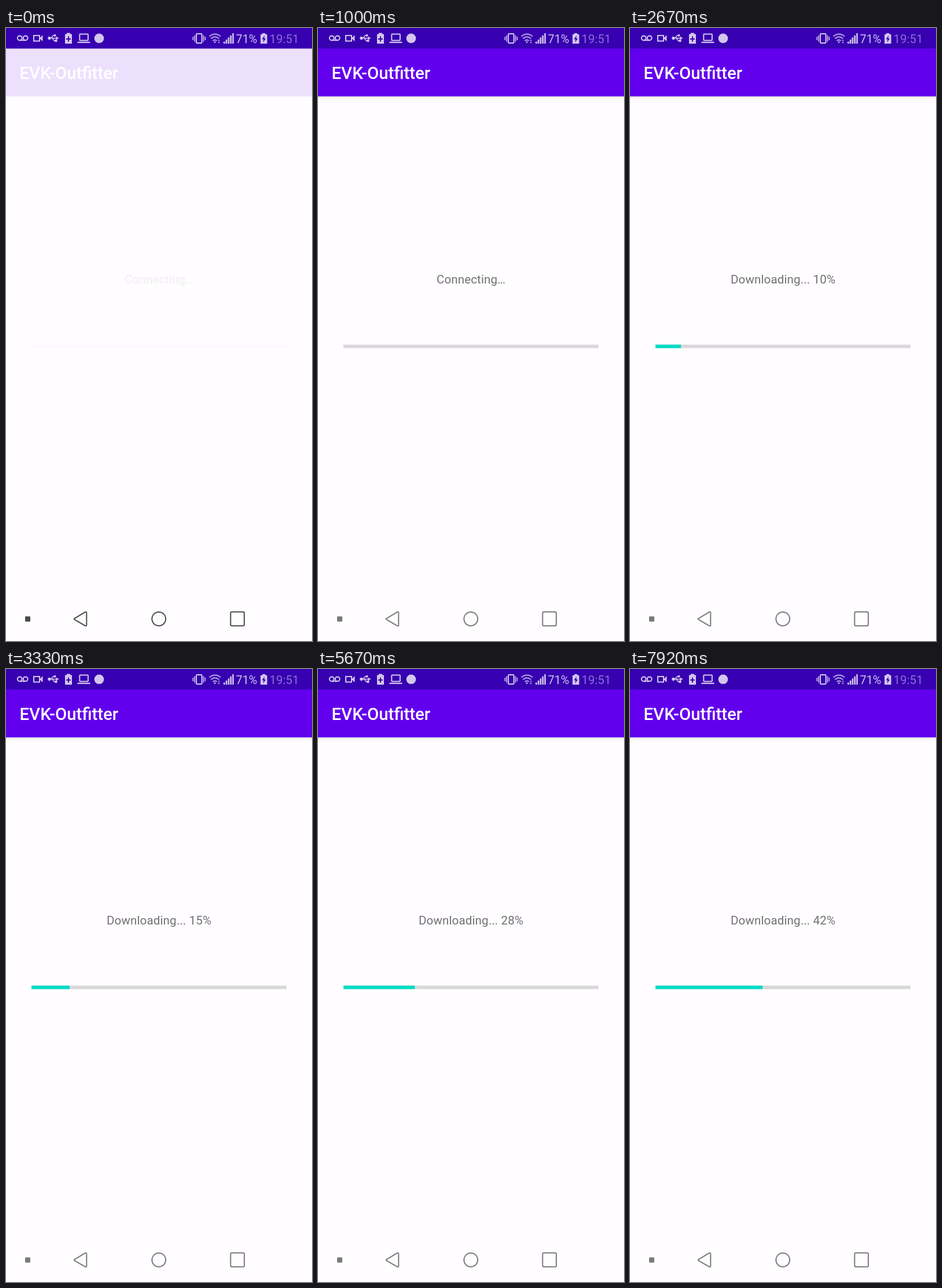
Write an HTML page that moves like this. It is 529 px wide and 1058 px high and loops after 8000 ms.

```html
<!DOCTYPE html>
<html lang="en">
<head>
<meta charset="utf-8">
<title>Download progress</title>
<style>
  html, body { margin: 0; width: 100%; height: 100%; overflow: hidden; background: #fffdff; }
  svg { display: block; width: 529px; height: 1058px; }
  text { font-family: Roboto, "Noto Sans", sans-serif; }
  .line { fill: none; stroke-width: 2; }
  #status { fill: #d2c6ee; stroke: none; }
  #status .line { fill: none; stroke: #d2c6ee; }
  #status .cut { fill: #3700b0; }
  #status .dim { fill: #b9a5e3; }
  #label { font-size: 20.57px; letter-spacing: .12px; fill: #727073; text-anchor: middle; }
  #title { font-size: 29.4px; font-weight: 500; fill: #fff; }
</style>
</head>
<body>
<svg viewBox="0 0 529 1058">
  <defs>
    <linearGradient id="shade" x2="0" y2="1">
      <stop stop-color="#000" stop-opacity=".12"/>
      <stop offset="1" stop-color="#000" stop-opacity="0"/>
    </linearGradient>
  </defs>
  <rect width="529" height="1058" fill="#fffdff"/>

  <g id="page">
    <rect y="118" width="529" height="5" fill="url(#shade)"/>
    <rect y="35" width="529" height="83" fill="#6200ee"/>
    <text id="label" x="264.5" y="441"></text>
    <rect x="44" y="546.5" width="441" height="6" fill="#dad7da"/>
    <rect id="bar" x="44" y="546.5" width="0" height="6" fill="#00dbc4"/>
  </g>
  <text id="title" x="23.5" y="88">EVK-Outfitter</text>

  <rect width="529" height="35.5" fill="#3700b0"/>
  <g id="status">
    <!-- voicemail, camera -->
    <g class="line">
      <circle cx="23.7" cy="17.3" r="3.9"/>
      <circle cx="33.7" cy="17.3" r="3.9"/>
      <path d="M23.7 21.2H33.7"/>
      <rect x="48" y="13" width="10" height="9.5"/>
    </g>
    <path d="M58 17.7L63.5 12.3V23Z"/>
    <!-- usb -->
    <path class="line" style="stroke-width:1.6" d="M75 17.5H87M78 17.5L81.5 13H84M80 17.5L83.5 22H86"/>
    <circle cx="75" cy="17.5" r="2.7"/>
    <path d="M86.5 14.5L91.5 17.5L86.5 20.5Z"/>
    <circle cx="84.5" cy="12.7" r="2"/>
    <rect x="84.5" y="20" width="4" height="4"/>
    <!-- charge saver -->
    <path d="M105 8.5H111V10.5H114V27H102V10.5H105Z"/>
    <path class="cut" d="M107 14.5H109V18H112V20H109V23.5H107V20H104V18H107Z"/>
    <!-- laptop -->
    <rect class="line" x="127.3" y="10.5" width="14.6" height="11" rx="1"/>
    <rect x="123.5" y="23.7" width="22" height="2.2"/>
    <circle cx="161" cy="17.8" r="8.3"/>
    <!-- vibrate -->
    <rect class="line" x="329" y="10" width="9.6" height="16" rx="1.2"/>
    <path class="line" style="stroke-width:1.6" d="M326.2 12.5V23.5M323.3 15V21M341.5 12.5V23.5M344.4 15V21"/>
    <!-- wifi -->
    <g class="line" style="stroke-width:1.9;opacity:.85">
      <path d="M351.5 14.5Q361.3 6.5 371 14.5"/>
      <path d="M354.3 18.3Q361.3 12.3 368.2 18.3"/>
      <path d="M357.5 22Q361 18.8 364.5 22"/>
    </g>
    <path class="dim" d="M359 24L361 22.6L363 24L361 26.5ZM366 22.3L368 19.8L370 22.3ZM366 24L368 26.5L370 24Z"/>
    <g id="bars"></g>
    <text x="397.6" y="25.7" font-size="19.7">71%</text>
    <path d="M443 9H448.500V11H451.500V27H440V11H443Z"/>
    <path class="cut" d="M447 13L442.500 19.600H445.300L444.400 25L449.200 18H446.300Z"/>
    <text x="455.5" y="25.7" font-size="20.5" fill="#8d6dd0">19:51</text>
  </g>

  <g id="nav" class="line" stroke-linejoin="round">
    <rect id="dot" x="33" y="1015.500" width="9" height="9" rx="1" stroke="none"/>
    <path d="M118.300 1019.200L136.800 1008.200Q139.300 1007 139.300 1009.500V1030.300Q139.300 1032.800 136.800 1031.600L118.300 1020.800Q117.200 1020 118.300 1019.200Z"/>
    <circle cx="264.200" cy="1019.800" r="11.900"/>
    <rect x="388.300" y="1007.800" width="23.600" height="24" rx="2"/>
  </g>
</svg>
<script>
const LOOP = 8000, STEP = 1000 / 12, START = 1160;
const $ = id => document.getElementById(id);

// [ms, value] points, straight lines between them
const fade = [[0, .11], [80, .36], [170, .64], [250, .87], [330, 1]];
const percent = [[START, 0], [1920, 5.2], [3330, 15.2], [4580, 22.3],
  [6500, 33.1], [6670, 33.1], [6900, 34.1], [7170, 36.1], [7910, 42.2]];

function at(points, t) {
  if (t <= points[0][0]) return points[0][1];
  for (let i = 1; i < points.length; i++) {
    const [t0, v0] = points[i - 1], [t1, v1] = points[i];
    if (t < t1) return v0 + (v1 - v0) * (t - t0) / (t1 - t0);
  }
  return points[points.length - 1][1];
}

for (let i = 0; i < 5; i++) {
  const bar = document.createElementNS("http://www.w3.org/2000/svg", "rect");
  const h = 3.5 + i * 3.6;
  for (const [k, v] of Object.entries({ x: 376 + i * 3.8, y: 27 - h, width: 2.6, height: h }))
    bar.setAttribute(k, v);
  $("bars").append(bar);
}

function draw(now) {
  const time = now % LOOP;
  const t = Math.floor((time + 4) / STEP) * STEP;
  const shown = at(fade, t);
  const done = Math.floor(at(percent, t));
  const tone = Math.round(68 + 54 * shown);
  const grey = `rgb(${tone},${tone},${tone + 1})`;

  $("page").setAttribute("opacity", shown);
  $("nav").setAttribute("stroke", grey);
  $("dot").setAttribute("fill", grey);
  $("bar").setAttribute("width", 4.41 * done);
  $("label").textContent = t < START ? "Connecting…" : `Downloading... ${done}%`;
}

function tick() {
  draw(performance.now());
  requestAnimationFrame(tick);
}
tick();
</script>
</body>
</html>
```
